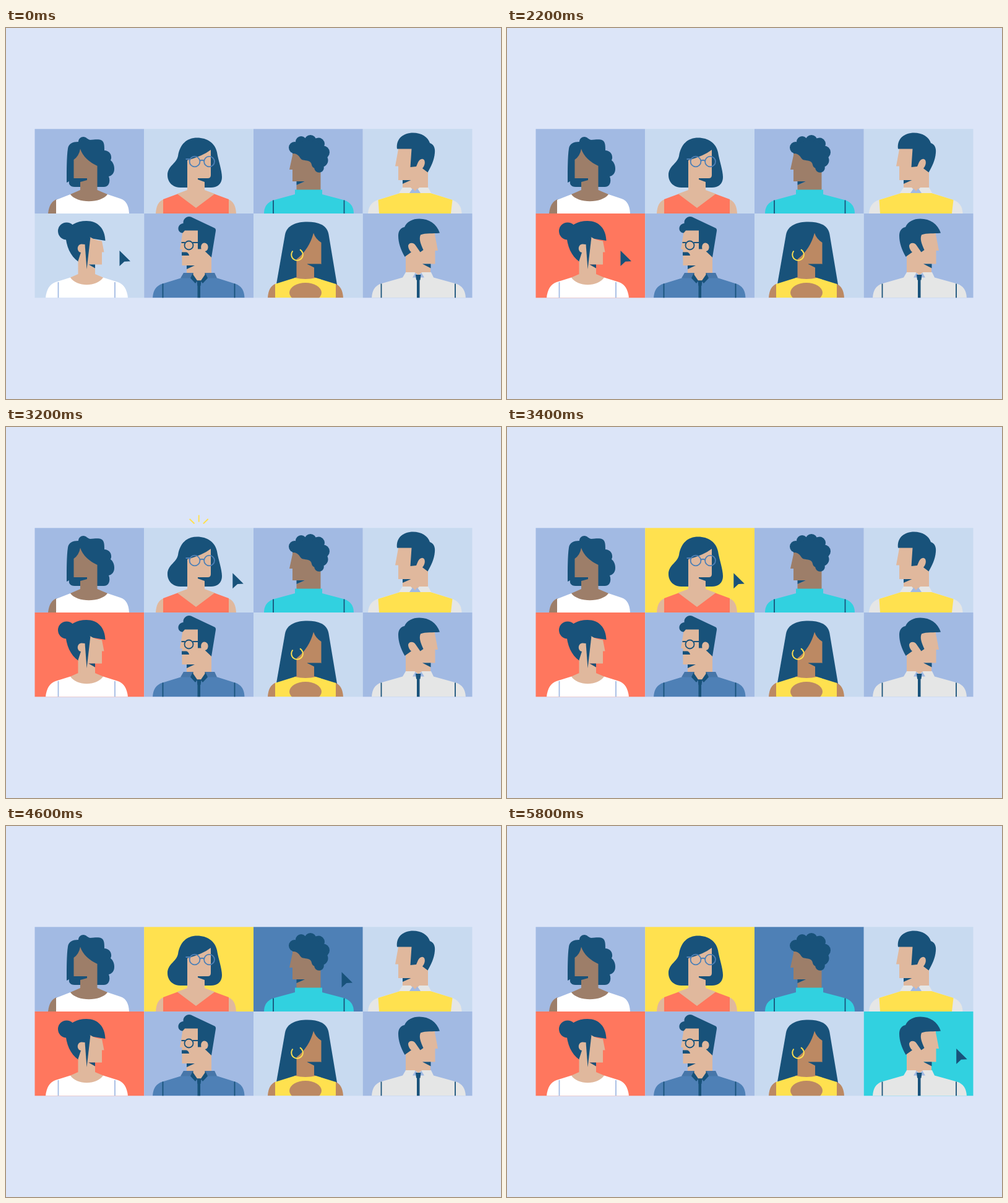
An HTML page that plays this animation: 800x600 px, repeating every 7.8 s.

```html
<!DOCTYPE html>
<html lang="en">
<head>
<meta charset="utf-8">
<title>Team call</title>
<style>
html,body{margin:0;width:100%;height:100%;overflow:hidden;background:#dce5f8}
svg{display:block;width:100vw;height:100vh}
.n{fill:#18527a}.l{fill:#e0b89d}.d{fill:#9d7e69}.t{fill:#bc8963}
.w{fill:#fff}.g{fill:#e5e6e6}.y{fill:#ffe14f}.c{fill:#ff775e}
.b{fill:#4e80b6}.q{fill:#31d1e0}.m{fill:#a2bae3}
.s{fill:none;stroke:#18527a;stroke-width:1.8}
</style>
</head>
<body>
<svg viewBox="0 0 800 600">
<defs><clipPath id="wall"><rect x="46.5" y="163.3" width="707" height="273"/></clipPath>
<clipPath id="top"><rect x="46.5" y="163.3" width="707" height="136.7"/></clipPath></defs>
<g id="tiles"></g>

<g clip-path="url(#top)">
<!-- wavy bob, white top -->
<g>
<path class="n" d="M98 250C98 230 98 208 100 195C101 187 108 184 117 184C117 179 121 176 125 176C130 176 131 180 136 181C143 181 149 179 155 182C159 185 159 191 159 198C166 198 171 204 170 211L169 214C173 217 175 222 175 228C175 235 171 239 166 240C169 247 167 257 158 257H111C104 257 101 253 102 248Z"/>
<path class="d" d="M109.500 213Q118 207 120 195.500Q126 213 147.500 223V262L164 269L164 286H104V269L120 262V249L131 246V243H109.500Z"/>
<path class="d" d="M68 300Q70 281 82 277V300Z"/>
<path class="w" d="M81 300V278L104 269C115 284 153 284 164 269L185 276Q198 280 199 300Z"/>
</g>
<!-- round glasses, coral top -->
<g>
<path class="n" d="M309 177.500C325 177.500 338 186 341 201C343 214 349 230 349 241C349 252 342 258 331 258H282C269 258 261 249 261 238C261 223 275 220 278 207C281 188 292 177.500 309 177.500Z"/>
<path class="l" d="M293 214Q318 207 331 197V238Q331 243 326 243H310V245L321 249V262L337 268V294H277V268L293 262Z"/>
<path class="l" d="M242 300Q243 281 255 277V300ZM372 300Q371 281 359 277V300Z"/>
<path class="c" d="M254 300V277L277 268.500L307 291L337 268.500L360 277V300Z"/>
<path class="s" style="stroke:#4e80b6" d="M290.500 212H297M313.300 215Q316.700 212.500 320.200 215"/>
<g class="s" style="stroke:#4e80b6"><circle cx="305" cy="216" r="8.400"/><circle cx="328.500" cy="216" r="8.400"/></g>
</g>
<!-- curly hair, teal turtleneck -->
<g>
<path class="d" d="M463 201V206L458 229H463V248H483L469.500 254V263H508.500V215L490 200Z"/>
<path class="n" d="M469.500 248H483L469.500 254Z"/>
<g class="n"><circle cx="466.500" cy="193.500" r="9.500"/><circle cx="477" cy="184" r="9"/><circle cx="492" cy="182.500" r="9.500"/><circle cx="505" cy="187.500" r="10"/><circle cx="512.500" cy="201" r="10.500"/><circle cx="509.500" cy="214" r="11"/><circle cx="506" cy="226" r="7.800"/>
<path d="M463 203C471 202 474 208 477 212C480 215 488 213 492 217C495 220 493 225 499 227L510 218L512 188L485 180L466 191Z"/></g>
<path class="q" d="M417 300Q417 284 432 278.500L467 269V261.500H511V269L547 278.500Q562 284 562 300Z"/>
<path class="s" d="M432 278.500V300M546.500 278.500V300"/>
</g>
<!-- short hair, yellow vest -->
<g>
<path class="l" d="M634 192V196L629 223.500H634V246H654L641 251V260H682V195Z"/>
<path class="n" d="M641 246H654.500L641 252Z"/>
<path class="n" d="M632 195.500C630 179 642 169.500 658 169.500C671 169.500 682 176 685 186C691 188 694 194 693 202C692 214 687 224 681.500 233.500L673 227C677 223 678 216 675.500 213C672 210 668 213 666 217L663 224L653.500 225L655.500 195.500Z"/>
<path class="g" d="M585 300Q586 283 601 278L637 267L641 258H682L687 267L721 278Q736 283 736.500 300Z"/>
<path class="y" d="M603 300L601.500 278L637 267H686L721.500 278L719 300Z"/>
<path class="g" d="M641 258H682L687 267H635Z"/>
<path class="l" d="M654 258H668L661 265Z"/>
<path class="m" d="M652 267L657 259.500L661 264L665 259.500L670 267Z"/>
</g>
</g>

<g clip-path="url(#wall)">
<!-- hair bun -->
<g>
<circle class="n" cx="98" cy="328.500" r="14"/>
<path class="n" d="M96 333C101 319 114 312 130 312C149 312 160 325 160.500 344L136 340L131 378H117C104 369 97 353 96 333Z"/>
<path class="l" d="M136 338C142 342 148 344 155 344.500L158.500 362.500H155V382.500H133L144 388.500V398L157 403.500V416H104V403.500L116.500 398V377L121 363C114 362 114 350 122 349.500L127.500 350Z"/>
<path class="n" d="M133.500 382.500H144V388.500Z"/>
<path class="n" d="M127 343L130.500 390L136.500 338Z"/>
<path class="w" d="M64 436.500Q66 416 80 411L104 403.500C114 419 147 419 157 403.500L181 411Q195 416 197 436.500Z"/>
<path class="s" style="stroke:#a2bae3" d="M84.500 411V437M176 411V437"/>
</g>
<!-- moustache, blue shirt -->
<g>
<path class="l" d="M285 326V334L281 358H284.500V384H305L292 389V398H332V326Z"/>
<path class="n" d="M292 384H305L292 390Z"/>
<path class="n" d="M285.500 331.500C276 331 276 317 286.500 316C286 309 291 305 296 305Q299 305 302 307L337 323.500Q339.500 325 339 328L332 371L321.500 361C328 361 329 348 320.500 347.500C316 348 314.500 352 315.500 357.500H310V327.500H289Z"/>
<path class="n" d="M284 368V362.500H291Q295 363 296 368Z"/>
<circle class="s" cx="295.500" cy="351.500" r="7"/>
<path class="s" d="M283.500 347H289.500M301.500 347H316"/>
<path class="b" d="M237 436.500Q238 418 253 413.500L284 404L287 396H337L340 404L370 413.500Q385 418 385.500 436.500Z"/>
<path fill="#4776a9" d="M287 396H302L298 404.500H282ZM322 396H337L341 404.500H326Z"/>
<path class="n" d="M298 404.500L302 396H322L326 404.500L318 413L314 408.500V437H309.500V408.500L306 413Z"/>
<path class="l" d="M302.500 395.500H321.500V399L315 408.500H309L302.500 399Z"/>
<path class="n" d="M308.500 408.500H315.500L314.500 417H309.500Z"/>
<path class="s" d="M253.500 413.500V437M369.500 413.500V437"/>
</g>
<!-- long hair, hoop earring -->
<g>
<path class="n" d="M437 414L451 334C454 319 469 313.500 487 313.500C505 313.500 519 319 521.500 334L535 415Z"/>
<path class="t" d="M497 331.500Q500 341 509.500 347V382H487L498 386V403L501 404V414H466V404L469.500 403V374Q490 358 497 331.500Z"/>
<path class="n" d="M486.500 381.500H509.500L498 387.500Z"/>
<path class="t" d="M423 436.500Q424 418 436 413.500V436.500ZM545 436.500Q544 418 532 413.500V436.500Z"/>
<path class="y" d="M435 436.500V414L467 404Q484 408 501 404L533 414V436.500Z"/>
<ellipse class="t" cx="484" cy="428" rx="26" ry="16"/>
<path class="s" style="stroke:#ffe14f" d="M463.500 360.500A9.300 9.300 0 1 0 475 358.400"/>
</g>
<!-- side parting, grey shirt -->
<g>
<path class="l" d="M693 328V334L698 360H693.500V381.500H673L686 387V397H646V335Z"/>
<path class="n" d="M673 381.500H686.500V388.500Z"/>
<path class="n" d="M701 331.500C690 333 678 331 670 334.500C667 341 670 349 674.500 359L669.500 362.500L661.500 351C658 346 651 347 650 352C650 357 653 361 655 362.500L644.500 370C638 359 634 347 634 336C634 328 638 323 644 322C648 313 657 308.500 668 308.500C684 308.500 696 317 701 331.500Z"/>
<path class="g" d="M591 436.500Q592 418 606 413.500L641 403.500L646 395H687L691 403.500L727 413.500Q742 418 743 436.500Z"/>
<path class="l" d="M659.500 394.500H673L666.500 399.500Z"/>
<path class="m" d="M657 403.500L661.500 396L666.500 400L671.500 396L676 403.500Z"/>
<path class="n" d="M662 399H670.500L669.500 407.500H668.500V437H664V407.500H663Z"/>
<path class="s" d="M606.500 413.500V437M726 413.500V437"/>
</g>
</g>
<path id="rays" fill="none" stroke-width="1.900"/>
<path id="cursor" class="n" d="M0 0L17.500 17.200L7.800 17.800L0 25Z"/>
</svg>
<script>
const $ = id => document.getElementById(id);
const LOOP = 7800, W = 176.75, X0 = 46.5, ROWS = [163.3, 300, 436.3];
const MID = '#a2bae3', LIGHT = '#c8daf0';

// each pick: cursor arrives, click rays flash, then the tile is coloured
const picks = [
  {col: 0, row: 1, color: '#ff775e', move: 0, click: 2000, x: 183.5, y: 360, ray: 135},
  {col: 1, row: 0, color: '#ffe14f', move: 2700, click: 3200, x: 366.3, y: 236.3, ray: 311.7},
  {col: 2, row: 0, color: '#4e80b6', move: 3900, click: 4400, x: 542.5, y: 236.3, ray: 488.4},
  {col: 3, row: 1, color: '#31d1e0', move: 5100, click: 5600, x: 726.2, y: 360, ray: 665.5}
];
const FLASH = 200;

const tiles = [];
for (let i = 0; i < 8; i++) {
  const col = i % 4, row = i >> 2;
  const r = document.createElementNS('http://www.w3.org/2000/svg', 'rect');
  const attrs = {x: X0 + col * W, y: ROWS[row], width: W, height: ROWS[row + 1] - ROWS[row]};
  for (const k in attrs) r.setAttribute(k, attrs[k]);
  tiles.push({el: r, base: (col + row) % 2 ? LIGHT : MID});
  $('tiles').append(r);
}

function rayPath(x, row) {
  const at = row ? y => 442.5 + y : y => 157 - y;
  return `M${x - 7.2} ${at(0.7)}L${x - 15} ${at(8.2)}M${x} ${at(3.5)}V${at(14.5)}M${x + 7.2} ${at(0.7)}L${x + 15} ${at(8.2)}`;
}

function draw(t) {
  tiles.forEach((tile, i) => {
    const p = picks.find(p => p.row * 4 + p.col === i);
    tile.el.setAttribute('fill', p && t >= p.click + FLASH ? p.color : tile.base);
  });
  const now = picks.filter(p => t >= p.move).pop();
  $('cursor').setAttribute('transform', `translate(${now.x} ${now.y})`);
  const lit = t >= now.click && t < now.click + FLASH;
  $('rays').setAttribute('d', lit ? rayPath(now.ray, now.row) : '');
  $('rays').setAttribute('stroke', now.color);
}

const start = performance.now();
function tick() {
  draw((performance.now() - start) % LOOP);
  requestAnimationFrame(tick);
}
tick();
</script>
</body>
</html>
```
